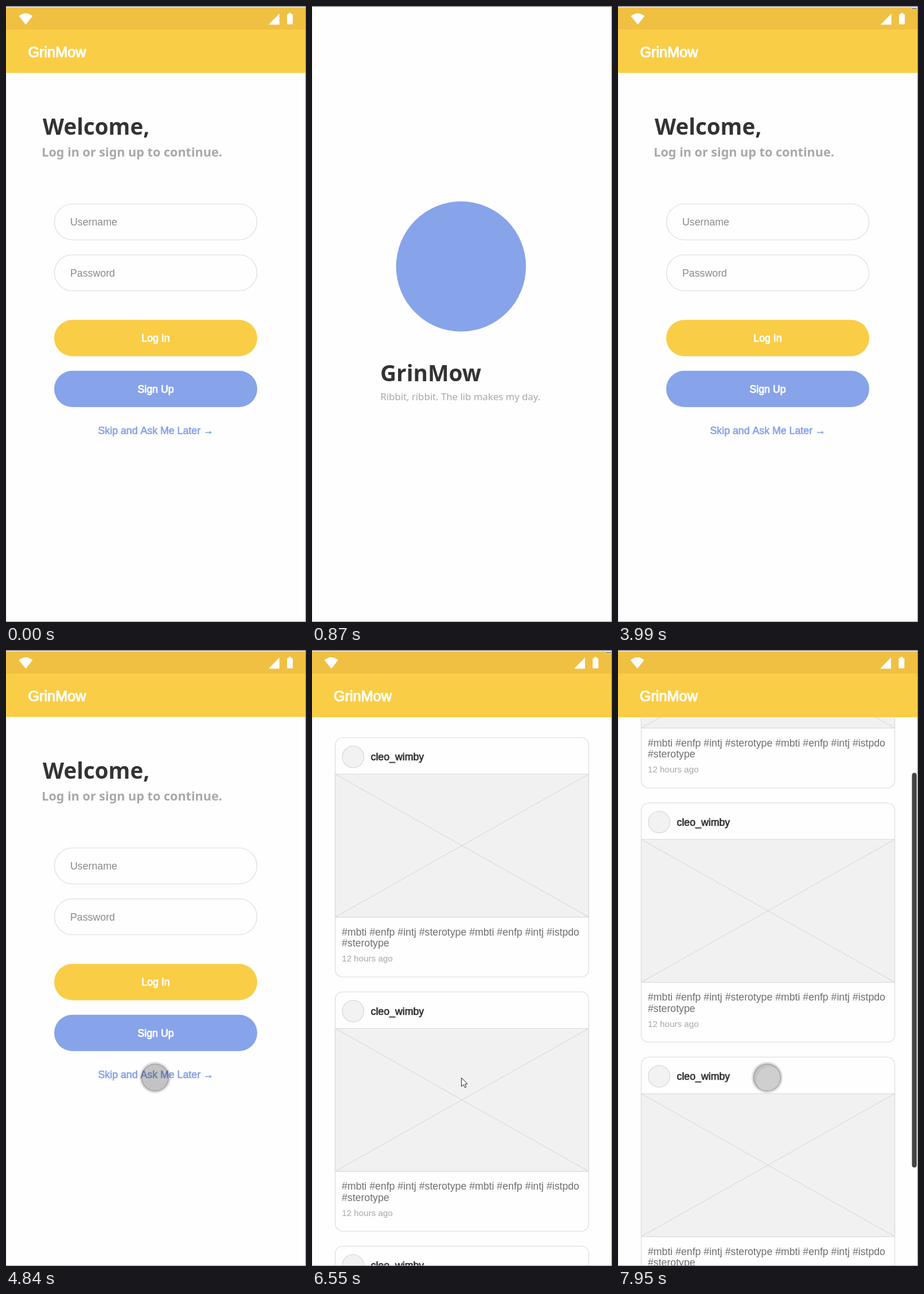
Write an HTML page with a canvas that moves like this. It is 523x1072 px and loops after 8000 ms.

```html
<!DOCTYPE html>
<html lang="en">
<head>
<meta charset="utf-8">
<title>App prototype</title>
<style>
  html, body { margin: 0; width: 100%; height: 100%; overflow: hidden; background: #fefefe; }
  canvas { display: block; }
</style>
</head>
<body>
<canvas id="stage" width="523" height="1072"></canvas>
<script>
const ctx = document.getElementById('stage').getContext('2d');
const LOOP = 8000;
const APP = 'GrinMow', USER = 'cleo_wimby';
const YELLOW = '#facd46', AMBER = '#f0c042', BLUE = '#87a3ea';
const PAPER = '#fefefe', LINE = '#dcdcdc', DARK = '#333', GREY = '#a8a8a8';
const SANS = '"Liberation Sans", Arial, sans-serif';
const HUMANIST = '"Noto Sans", "Open Sans", sans-serif';
const BODY = 17.75;
const CARD_STEP = 442.5;

function rect(x, y, w, h, color) {
  ctx.fillStyle = color;
  ctx.fillRect(x, y, w, h);
}

function paint(fill, stroke, width = 1.2) {
  if (fill) { ctx.fillStyle = fill; ctx.fill(); }
  if (stroke) { ctx.strokeStyle = stroke; ctx.lineWidth = width; ctx.stroke(); }
}

function rounded(x, y, w, h, r, fill, stroke) {
  ctx.beginPath();
  ctx.roundRect(x, y, w, h, r);
  paint(fill, stroke);
}

function circle(x, y, r, fill, stroke, width) {
  ctx.beginPath();
  ctx.arc(x, y, r, 0, Math.PI * 2);
  paint(fill, stroke, width);
}

function polygon(points, fill, stroke, width) {
  ctx.beginPath();
  points.forEach(([x, y]) => ctx.lineTo(x, y));
  ctx.closePath();
  paint(fill, stroke, width);
}

function text(str, x, y, font, color, { align = 'left', heavy = 0 } = {}) {
  ctx.font = font;
  ctx.textAlign = align;
  ctx.fillStyle = color;
  ctx.fillText(str, x, y);
  if (heavy) {
    ctx.strokeStyle = color;
    ctx.lineWidth = heavy;
    ctx.lineJoin = 'round';
    ctx.strokeText(str, x, y);
  }
}

const label = (str, x, y, color, options, size = BODY) =>
  text(str, x, y, `${size}px ${SANS}`, color, options);

function frame() {
  rect(0, 0, 523, 1, '#777');
  rect(0, 1, 523, 1, '#d4d4d4');
  rect(0, 2, 1, 1070, '#e6e6e6');
  rect(522, 0, 1, 1072, '#858585');
  rect(0, 1071, 523, 1, '#999');
}

function header(bottom, nudge) {
  rect(0, 2.5, 522, 38.5, AMBER);
  rect(0, 41, 522, bottom - 41, YELLOW);
  ctx.save();
  ctx.translate(nudge, 0);
  ctx.beginPath();
  ctx.moveTo(33.7, 32.5);
  ctx.lineTo(21.7, 17.5);
  ctx.quadraticCurveTo(33.7, 8, 45.7, 17.5);
  ctx.closePath();
  paint('#fff');
  polygon([[457, 32.5], [476, 13], [476, 32.5]], '#fff');
  rounded(489.3, 14, 10, 18, 1.5, '#fff');
  rect(492.3, 12, 4, 3, '#fff');
  label(APP, 37.7, 88.5, '#fff', { heavy: 1.2 }, 25.3);
  ctx.restore();
}

function splash() {
  circle(259.8, 453.3, 113.2, BLUE);
  text(APP, 119, 653, `bold 38.8px ${HUMANIST}`, DARK);
  text('Ribbit, ribbit. The lib makes my day.', 119.3, 686, `16.75px ${HUMANIST}`, GREY);
}

function login() {
  header(116.5, 0.7);
  text('Welcome,', 64, 224, `bold 38.5px ${HUMANIST}`, DARK);
  text('Log in or sign up to continue.', 62.3, 262, `bold 21.6px ${HUMANIST}`, GREY);
  [['Username', 344.5], ['Password', 433]].forEach(([name, y]) => {
    rounded(84.5, y, 353, 62.5, 31.2, PAPER, LINE);
    label(name, 112, y + 37.5, '#8a8a8a');
  });
  [['Log In', 546.3, YELLOW], ['Sign Up', 634.8, BLUE]].forEach(([name, y, color]) => {
    rounded(84, y, 354, 63.2, 31.6, color);
    label(name, 261, y + 38, '#fff', { align: 'center', heavy: 0.9 });
  });
  label('Skip and Ask Me Later →', 160.5, 745, BLUE, { heavy: 0.7 });
}

function card(y) {
  rounded(40.5, y, 442, 416.5, 13, PAPER, LINE);
  circle(71.7, y + 33.5, 18.8, '#f2f2f2', '#d8d8d8');
  label(USER, 102.5, y + 39.5, DARK, { heavy: 0.7 });

  const top = y + 63.5, bottom = y + 312.3;
  ctx.beginPath();
  ctx.rect(40.5, top, 442, bottom - top);
  ctx.moveTo(40.5, top);
  ctx.lineTo(482.5, bottom);
  ctx.moveTo(482.5, top);
  ctx.lineTo(40.5, bottom);
  paint('#f1f1f1', '#d9d9d9');

  label('#mbti #enfp #intj #sterotype #mbti #enfp #intj #istpdo', 52, y + 344, '#6f6f6f', {}, 17.7);
  label('#sterotype', 52, y + 363.5, '#6f6f6f', {}, 17.7);
  label('12 hours ago', 52, y + 389.5, GREY, {}, 15.2);
}

function feed(scroll) {
  ctx.save();
  ctx.beginPath();
  ctx.rect(1, 41, 521, 1030);
  ctx.clip();
  for (let i = 0; i < 4; i++) card(152.5 + i * CARD_STEP - scroll);
  ctx.restore();
  header(117, 0);
}

function scrollbar(scroll, alpha) {
  ctx.globalAlpha = alpha;
  rounded(512.2, 3.5 + scroll * 0.638, 8.8, 687.5, 4.4, '#444', 'rgba(255,255,255,.4)');
  ctx.globalAlpha = 1;
}

function scrollStub() {
  rect(511, 3, 11, 3, '#e8dcb8');
  rect(512, 4, 9, 1, '#555');
}

// Translucent touch pointer; the light disc inside grows while pressed.
function touch(x, y, press = 0, shift = 0) {
  const glow = ctx.createRadialGradient(x, y, 23, x, y, 28.5);
  glow.addColorStop(0, 'rgba(0,0,0,.24)');
  glow.addColorStop(1, 'rgba(0,0,0,0)');
  ctx.beginPath();
  ctx.arc(x, y, 28.5, 0, Math.PI * 2);
  ctx.arc(x, y, 23, 0, Math.PI * 2, true);
  paint(glow);
  circle(x, y, 23.3, 'rgba(0,0,0,.23)', 'rgba(0,0,0,.12)', 1.5);
  if (!press) return;
  ctx.save();
  ctx.beginPath();
  ctx.arc(x, y, 23, 0, Math.PI * 2);
  ctx.clip();
  circle(x + shift, y + shift, press, 'rgba(255,255,255,.2)');
  ctx.restore();
}

function arrow(x, y) {
  const shape = [[0, 0], [0, 15], [3.5, 11.8], [6, 17], [8.3, 16], [6, 11], [10.5, 10.5]];
  polygon(shape.map(([dx, dy]) => [x + dx + 0.5, y + dy + 0.5]), '#fff', '#223', 1);
}

// Each scene holds from its start time until the next one begins.
const timeline = [
  [0, login],
  [130, () => rect(0, 1, 523, 1071, '#fff')],
  [590, scrollStub],
  [740, () => { ctx.globalAlpha = 0.5; splash(); ctx.globalAlpha = 1; }],
  [870, splash],
  [3720, () => {}],
  [3990, () => { login(); scrollStub(); }],
  [4270, login],
  [4580, () => { login(); touch(197.5, 579.5); }],
  [4720, () => { login(); touch(229, 662); }],
  [4840, () => { login(); touch(260, 744); }],
  [6130, () => { login(); touch(260, 744, 9.5, 1); }],
  [6270, () => {}],
  [6550, () => { feed(0); scrollStub(); arrow(260, 744); }],
  [6830, () => { feed(0); scrollbar(0, 1); touch(260, 744); }],
  [7380, () => { feed(0); scrollbar(0, 0.5); touch(260, 744); }],
  [7510, () => { feed(0); touch(260, 744); }],
  [7660, () => { feed(71.8); scrollbar(71.8, 1); touch(260, 744, 16, 5); }],
  [7800, () => { feed(200); scrollbar(200, 1); touch(260, 744, 19, 5); }],
  [7950, () => { feed(329); scrollbar(329, 1); touch(260, 744, 23, 4.5); }],
];

const start = performance.now();

function render(now) {
  const t = Math.max(0, now - start) % LOOP;
  rect(0, 0, 523, 1072, PAPER);
  frame();
  timeline.findLast(([from]) => from <= t)[1]();
  requestAnimationFrame(render);
}
render(start);
</script>
</body>
</html>
```
